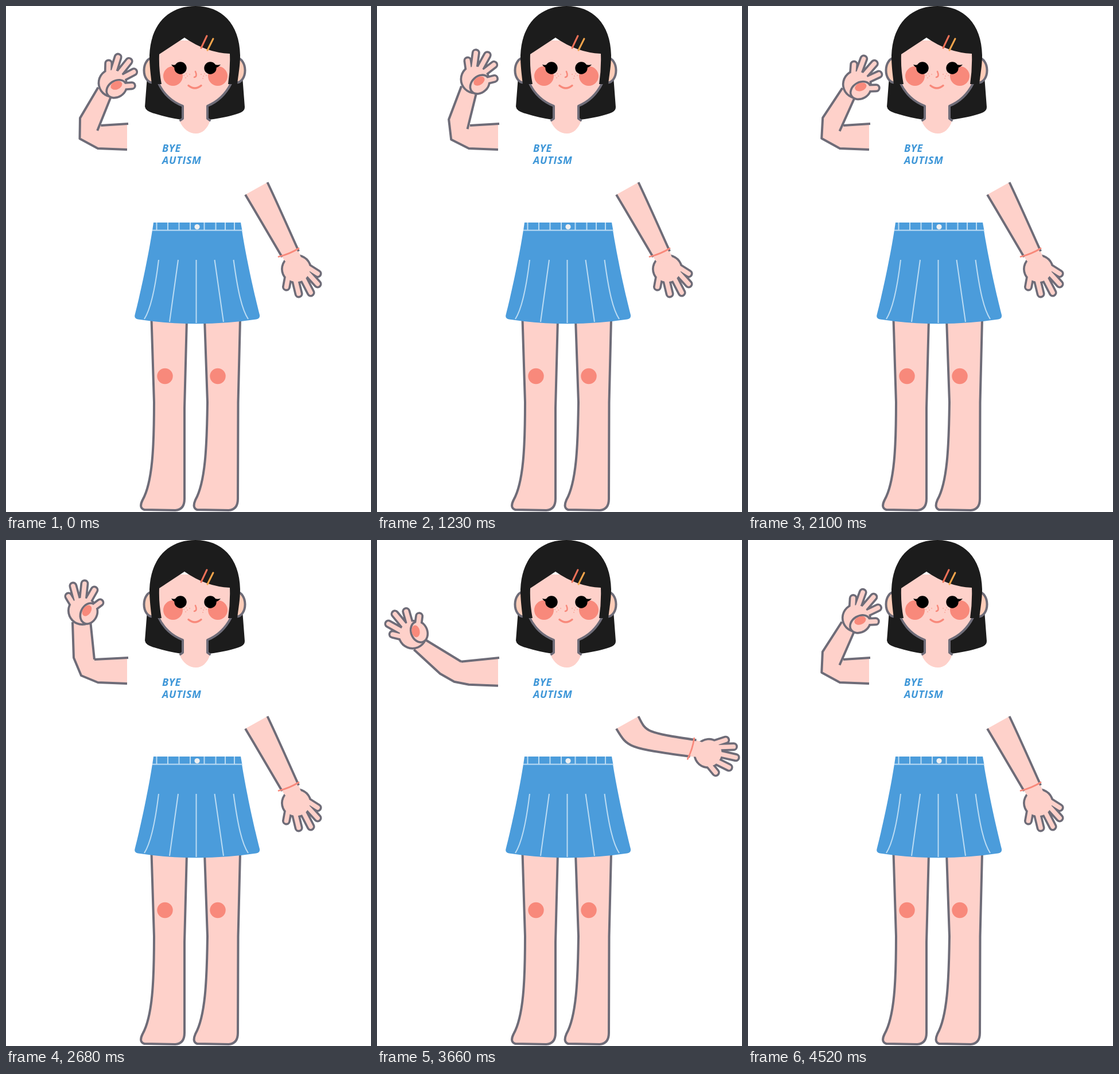
An HTML page that plays this animation: 636x881 px, repeating every 4.56 s.

```html
<!DOCTYPE html>
<html lang="en">
<head>
<meta charset="utf-8">
<title>Waving girl</title>
<style>
  html, body { margin: 0; width: 100%; height: 100%; overflow: hidden; background: #fff; }
  svg { display: block; width: 636px; height: 881px; }
  .line { fill: none; stroke: #6e6c78; stroke-width: 4; stroke-linejoin: round; stroke-linecap: round; }
  .butt { stroke-linecap: butt; }
  .skin { fill: #fed1ca; }
  .both { fill: #fed1ca; stroke: #6e6c78; stroke-width: 4; stroke-linejoin: round; }
  .ear { fill: #fdcdb9; }
  .hair { fill: #1c1c1c; }
  .blush { fill: #f8897b; }
  .pleat { fill: none; stroke: #bcdcf3; stroke-width: 2; }
  .mark { fill: none; stroke: #f8897b; stroke-linecap: round; }
  text { font: italic 700 18px "Open Sans", "Noto Sans", sans-serif; letter-spacing: .7px; fill: #3f97d8; }
</style>
</head>
<body>
<svg viewBox="0 0 636 881">
  <!-- legs -->
  <path class="both" d="M253.500 545L258 690C258 770 255 830 238 860Q231 874 241 877L295 878Q311 877 311 858V700L315 545"/>
  <path class="both" d="M346 545L351 690C350 770 347 830 330 860Q324 874 333 877L388 878Q404 877 404 858L404.500 690L408 545"/>
  <circle class="blush" cx="277" cy="644.5" r="13.7"/>
  <circle class="blush" cx="369" cy="644.5" r="13.7"/>

  <!-- skirt -->
  <g fill="#4b9cdb">
    <path d="M257 377H409L411.500 391H255Z"/>
    <path d="M255 390H411C417 430 431 495 442 538Q443 544 436 545.500Q333 561 230 545.500Q223 544 224.500 538C236 493 249 430 255 390Z"/>
  </g>
  <path class="pleat" d="M255 390.500H411M266 442C262 475 254 525 241 545M300 442L285 550M331.500 442V552M363.500 442L379 550M396.500 442C403 490 410 527 422 545"/>
  <path class="pleat" d="M262.500 377V390M282 377V390M301.500 377V390M321 377V390M345.500 377V390M365.500 377V390M382 377V390M398 377V390"/>
  <circle cx="333" cy="384.500" r="4.600" fill="#f0f0f0"/>

  <text x="272" y="254">BYE</text>
  <text x="272" y="275">AUTISM</text>

  <!-- head -->
  <path class="hair" d="M247 110L242 175Q243 183 258 187Q284 195 306 198H354Q392 193 410 185Q416 182 416 176L411 110Z"/>
  <ellipse class="both ear" cx="255" cy="112" rx="14.500" ry="21.500"/>
  <ellipse class="both ear" cx="402" cy="112" rx="14.500" ry="21.500"/>
  <path class="skin" d="M265 60H392V135C382 155 368 167 351 174V197L356 199C351 214 342 222 331 222C320 222 308 215 302 199L308 197V174C290 167 275 154 266 135Z"/>
  <path class="line" d="M266 135C275 154 290 167 308 174V196L304 199M392 135C382 155 368 167 351 174V196L355 199"/>
  <path class="hair" d="M254 136C252 118 250 104 250 86C252 30 285 0 330 0C375 0 407 30 408 86C408 104 405 118 403 136H387Q391 110 390 83Q348 81 311 55L267 84Q266 110 271 136Z"/>
  <path class="mark" stroke-width="3" style="stroke:#ef7158" d="M350 52L340 73"/>
  <path class="mark" stroke-width="3" style="stroke:#f2a54c" d="M361 57L351 77"/>
  <circle class="blush" cx="291" cy="122" r="17"/>
  <circle class="blush" cx="369" cy="122" r="17"/>
  <circle cx="304" cy="108" r="10.700"/>
  <circle cx="356" cy="108" r="10.700"/>
  <path d="M288 102Q294 104 299 101L296 108Q291 107 288 102ZM374 102Q367 104 361 101L364 108Q370 107 374 102Z"/>
  <path class="mark" stroke-width="2.500" d="M330 114Q334 123 328 124"/>
  <path class="mark" stroke-width="3.500" d="M318 138.500Q329 147.500 340 138.500"/>
  <path class="mark" stroke-width="1.500" d="M310 121h.1M314 118h.1M316 122h.1M320 119h.1M313 125h.1M340 119h.1M344 122h.1M346 118h.1M349 121h.1M343 126h.1"/>

  <!-- waving arm -->
  <path class="skin" id="waveSkin"/>
  <path class="line butt" id="waveLine"/>
  <g id="waveHand"></g>

  <!-- other arm -->
  <g id="restHand"></g>
  <path class="skin" id="restSkin"/>
  <path class="line butt" id="restLine"/>
  <path class="mark" id="band" stroke-width="2.800"/>
</svg>
<script>
const LOOP = 4560, STEPS = 111, STEP = LOOP / STEPS;
const GRAY = '#6e6c78', SKIN = '#fed1ca';
const $ = id => document.getElementById(id);

// [ms, degrees]
const wave = [[0, 32.4], [200, 8], [390, -28], [430, -32.2], [530, -14], [698, 13.8], [860, 30],
  [1010, 35.5], [1070, 34], [1300, 16], [1600, -26.5], [1643, -32.4], [1760, -14], [1920, 16],
  [2110, 35.5], [2400, 26], [2670, 0], [2870, -32.2], [2960, -14], [3110, 11], [3204, 21],
  [3290, 27], [3327, 26], [3500, -2], [3700, -50], [3740, -49], [4026, -37.5], [4270, -8.7],
  [4400, 17], [4519, 34.6], [4560, 32.4]];
const lift = [[0, 0], [3204, 0], [3327, 12], [3700, 51], [3740, 50], [4026, 22.4], [4270, 0], [4560, 0]];

// monotone cubic interpolation
function sample(keys, t) {
  const slope = i => keys[i + 1] && keys[i]
    ? (keys[i + 1][1] - keys[i][1]) / (keys[i + 1][0] - keys[i][0]) : 0;
  const tangent = i => {
    const a = slope(i - 1), b = slope(i);
    return a * b > 0 ? 2 * a * b / (a + b) : 0;
  };
  let i = 0;
  while (i < keys.length - 2 && t >= keys[i + 1][0]) i++;
  const [t0, a] = keys[i], [t1, b] = keys[i + 1], h = t1 - t0, u = (t - t0) / h;
  const s = u * u * (3 - 2 * u);
  return a + (b - a) * s + h * u * (1 - u) * ((1 - u) * tangent(i) - u * tangent(i + 1));
}

const stroke = (d, color, w) =>
  `<path d="${d}" fill="none" stroke="${color}" stroke-width="${w}" stroke-linecap="round"/>`;
const oval = (x, y, rx, ry, turn, color) =>
  `<ellipse cx="${x}" cy="${y}" rx="${rx}" ry="${ry}" transform="rotate(${turn} ${x} ${y})" fill="${color}"/>`;

// a gray silhouette with a thinner skin copy on top
function outlined(fingers, x, y, rx, ry, turn) {
  return stroke(fingers, GRAY, 15) + oval(x, y, rx, ry, turn, GRAY)
    + stroke(fingers, SKIN, 7.6) + oval(x, y, rx - 3.7, ry - 3.7, turn, SKIN);
}

$('waveHand').innerHTML =
  outlined('M118 113L109 98M124 106L117 80M134 104L137 76M142 108L154 87', 133, 123, 26, 26, 0)
  + outlined('M152 118L164 109', 144.5, 128, 16, 20.5, 25)
  + oval(141, 123, 7, 10.5, 35, '#f8897b');
$('restHand').innerHTML =
  outlined('M492 470L488.500 489M503 472L510 501M516 470L531 499M524 463L543 484M524 454L543 466', 506, 458, 27, 26, 0);

function turn([x, y], [px, py], deg, dx = 0, dy = 0) {
  const a = deg * Math.PI / 180, c = Math.cos(a), s = Math.sin(a);
  x -= px; y -= py;
  return [px + dx + x * c - y * s, py + dy + x * s + y * c];
}

function drawWave(deg, dx, dy) {
  const elbow = [140.5, 219], up = Math.max(0, deg);
  const spin = p => turn(p, elbow, deg, dx, dy);
  const outer = `M211 ${250 + dy / 2}L160 ${248 + dy / 2}`
    + `L${131 - .078 * deg} ${236 - .155 * deg + dy / 2}L${spin([118, 205])}L${spin([116, 143])}`;
  // the wrist narrows as the elbow bends
  const wrist = spin([147.5 - .12 * Math.abs(deg), 145]);
  const crook = [154 + .16 * deg, 208 + .28 * up + dy / 2];
  const top = [154 + (deg > 0 ? .35 : .16) * deg, 208 + dy / 2];
  $('waveSkin').setAttribute('d', `${outer}L${wrist}L${crook}L${top}L211 205Z`);
  $('waveLine').setAttribute('d', `${outer}M${wrist}L${crook}M${top}L213 205`);
  $('waveHand').setAttribute('transform', `translate(${dx} ${dy}) rotate(${deg} ${elbow})`);
}

function drawRest(deg, dx) {
  const elbow = [446, 344];
  const spin = p => turn(p, elbow, -deg, dx);
  const outer = `M455.500 307C469 335 469 335 ${spin([510, 427])}`;
  const wrist = spin([481, 437]);
  $('restLine').setAttribute('d', `${outer}M417 328.500C437 362 437 362 ${wrist}`);
  $('restSkin').setAttribute('d',
    `${outer}L${spin([514, 438])}L${spin([490, 449])}L${wrist}C437 362 437 362 417 328.500Z`);
  $('band').setAttribute('d', `M${spin([475, 436.5])}Q${spin([494, 432])} ${spin([510, 422])}`);
  $('restHand').setAttribute('transform', `translate(${dx} 0) rotate(${-deg} ${elbow})`);
}

let start;
function tick(now) {
  start ??= now;
  const t = Math.floor(((now - start) % LOOP + 10) / STEP) % STEPS * STEP;
  const up = sample(lift, t), k = (up / 51) ** 2;
  drawWave(sample(wave, t), -5 * k, .15 * up);
  drawRest(up, 6 * k);
  requestAnimationFrame(tick);
}
requestAnimationFrame(tick);
</script>
</body>
</html>
```
